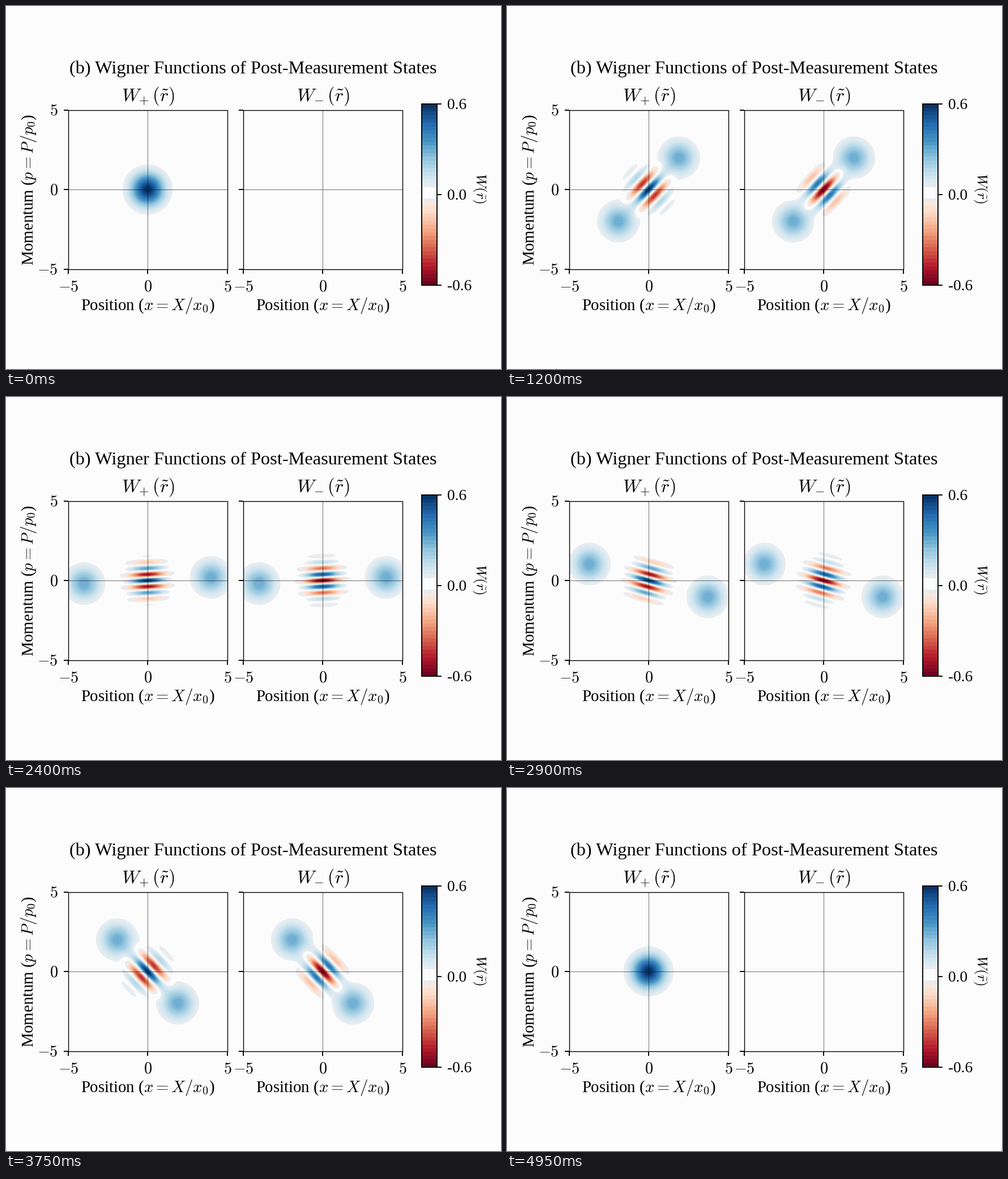
A matplotlib script for the animation above (5000 ms loop, 874 by 641 pixels).

```python
import math

import matplotlib.pyplot as plt
import numpy as np
from matplotlib.animation import FuncAnimation

W, H, DPI = 874, 641, 72          # at 72 dpi one point is one pixel
FRAMES, INTERVAL = 100, 50
BG = "#fcfcfc"
BINS = 48
UNIT = 28.1                       # pixels per phase-space unit
HALF = 5 * UNIT
MID_Y = 324
PANELS = {1: 250, -1: 559}        # parity sign -> panel centre
IMG_HALF = 140
RADIUS = 2.0

plt.rcParams["font.family"] = "Liberation Serif"
plt.rcParams["mathtext.fontset"] = "cm"

fig = plt.figure(figsize=(W / DPI, H / DPI), dpi=DPI, facecolor=BG)
ax = fig.add_axes([0, 0, 1, 1])
ax.axis("off")


def make_palette():
    """Stepped RdBu with a blank band around zero."""
    colors = plt.get_cmap("RdBu")((np.arange(BINS) + 0.5) / BINS)[:, :3]
    colors = np.round(colors * 255).astype(np.uint16)
    mid = BINS // 2
    colors[mid - 1:mid + 2] = 252
    colors[[mid - 2, mid + 2]] = 231, 236, 240
    return colors


PALETTE = make_palette()

# Two samples per pixel; only the upper half, the rest follows by symmetry.
X = (((np.arange(4 * IMG_HALF) + 0.5) / 2 - IMG_HALF) / UNIT).astype(np.float32)
P = -X[:2 * IMG_HALF]


def gauss(x0, p0):
    return np.outer(np.exp(-(P - p0) ** 2), np.exp(-(X - x0) ** 2))


VACUUM = gauss(0.0, 0.0)


def wigner(x0, p0, sign):
    """Cat state of the given parity, relative to the vacuum peak."""
    norm = 2 * (1 + sign * math.exp(-x0 ** 2 - p0 ** 2))
    if norm < 1e-9:
        return np.zeros_like(VACUUM)
    a, b = 2 * p0 * X, 2 * x0 * P
    fringe = np.outer(np.cos(b), np.cos(a)) + np.outer(np.sin(b), np.sin(a))
    total = gauss(x0, p0) + gauss(-x0, -p0) + 2 * sign * VACUUM * fringe
    return total / norm


def to_rgb(w):
    index = np.minimum(((w + 1) * (BINS / 2)).astype(np.intp), BINS - 1)
    rgb = PALETTE[index]
    rgb = rgb[::2, ::2] + rgb[1::2, ::2] + rgb[::2, 1::2] + rgb[1::2, 1::2]
    top = (rgb // 4).astype(np.uint8)
    return np.concatenate([top, top[::-1, ::-1]])


def picture(i, sign):
    phase = 2 * math.pi * i / (FRAMES - 1)
    x0 = RADIUS * (1 - math.cos(phase))
    p0 = RADIUS * math.sin(phase)
    return to_rgb(wigner(x0, p0, sign))


def line(xs, ys, width, **style):
    ax.plot(xs, ys, color="black", lw=width, solid_capstyle="butt", **style)


def box(left, right, top, bottom, width):
    ax.add_patch(plt.Rectangle((left, top), right - left, bottom - top,
                               fill=False, ec="black", lw=width, zorder=4))


def label(x, y, text, size, ha="center", angle=0):
    ax.text(x, y, text, size=size, ha=ha, va="baseline", color="black",
            rotation=angle, rotation_mode="anchor")


def draw_panel(cx, sign):
    left, right = cx - HALF, cx + HALF
    top, bottom = MID_Y - HALF, MID_Y + HALF
    image = ax.imshow(picture(0, sign),
                      extent=(cx - IMG_HALF, cx + IMG_HALF,
                              MID_Y + IMG_HALF, MID_Y - IMG_HALF),
                      interpolation="nearest", aspect="auto", zorder=1)
    line([left, right], [MID_Y, MID_Y], 1, alpha=0.55, zorder=3)
    line([cx, cx], [top, bottom], 1, alpha=0.55, zorder=3)
    box(left, right, top, bottom, 1.4)
    for value in (-5, 0, 5):
        x, y = cx + value * UNIT, MID_Y - value * UNIT
        line([x, x], [bottom, bottom + 8], 1.9, zorder=4)
        line([left - 8, left], [y, y], 1.9, zorder=4)
        label(x + 0.5, 503, f"${value}$", 28.3)
        if sign > 0:
            label(92, y + 9, f"${value}$", 28.3, ha="right")
    symbol = "+" if sign > 0 else "-"
    label(cx + 0.5, 168, rf"$W_{{{symbol}}}\,(\tilde{{r}})$", 32.4)
    label(cx, 537, "Position ($x = X/x_0$)", 28.7)
    return image


def draw_colorbar():
    left, right, top, bottom = 734, 761, 173, 493
    ax.imshow(PALETTE[::-1, None].astype(np.uint8),
              extent=(left, right, bottom, top),
              interpolation="nearest", aspect="auto", zorder=1)
    box(left, right, top, bottom, 1.9)
    for y, text in ((top, "0.6"), ((top + bottom) / 2, "0.0"), (bottom, "-0.6")):
        line([right, right + 8], [y, y], 1.9, zorder=4)
        label(778.5, y + 9.3, text, 27.5, ha="left")
    label(830, 322, r"$W(\tilde{r})$", 25.2, angle=270)


images = {sign: draw_panel(cx, sign) for sign, cx in PANELS.items()}
draw_colorbar()
label(436.7, 119, "(b) Wigner Functions of Post-Measurement States", 32.4)
label(48, MID_Y, "Momentum ($p = P/p_0$)", 28.7, angle=90)
ax.set_xlim(0, W)
ax.set_ylim(H, 0)

cache = {}


def update(i):
    # The second half of the loop mirrors the first in momentum.
    k = min(i, FRAMES - 1 - i)
    for sign, image in images.items():
        if (k, sign) not in cache:
            cache[k, sign] = picture(k, sign)
        rgb = cache[k, sign]
        image.set_data(rgb if i == k else rgb[::-1])
    return list(images.values())


anim = FuncAnimation(fig, update, frames=FRAMES, interval=INTERVAL, repeat=True)
plt.show()
```
